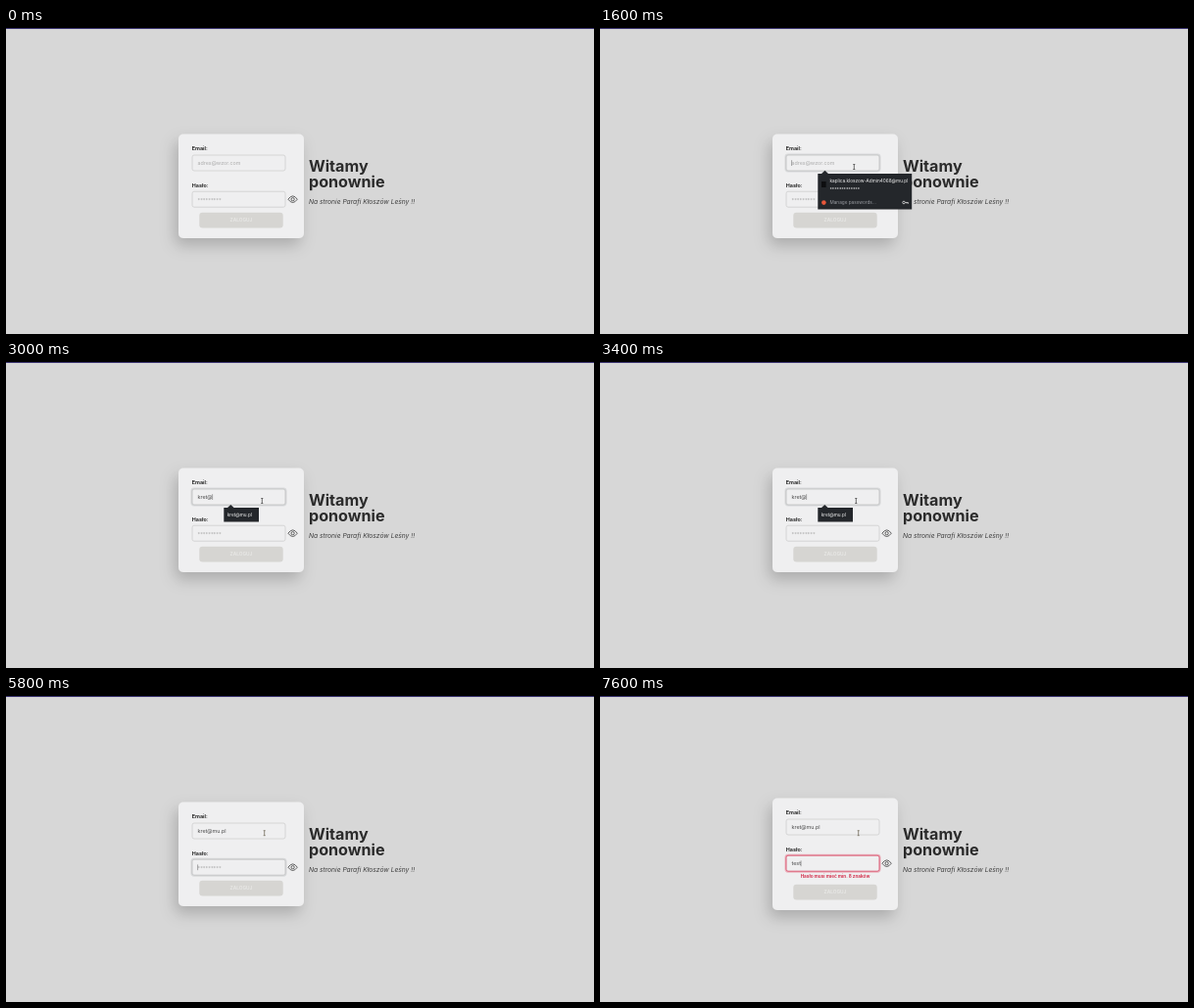
Recreate the animation shown at these times as an HTML page. Size 600 by 313 pixels, loop 8000 ms.

```html
<!DOCTYPE html>
<html lang="pl">
<head>
<meta charset="utf-8">
<title>Logowanie</title>
<style>
  html, body { margin: 0; width: 100%; height: 100%; overflow: hidden; background: #d7d7d7; }
  svg { display: block; width: 100vw; height: 100vh; font-family: Inter, sans-serif; }
  text { white-space: pre; }
  .label { font-size: 5.4px; font-weight: 700; fill: #2c2c2c; }
  .value { font-size: 5.4px; fill: #4c4c4c; }
  .hint { font-size: 5.35px; fill: #acacac; }
  .error { font-size: 4.65px; font-weight: 700; fill: #d43652; text-anchor: middle; }
  .box { fill: #efeff0; stroke: #cfcfcf; stroke-width: .8; }
  .ring { fill: none; stroke: none; stroke-width: 1.6; }
  .focus .box { stroke: #bfc0c1; }
  .focus .ring { stroke: #c9cacc; stroke-opacity: .6; }
  .focus.bad .box { stroke: #d9405f; }
  .focus.bad .ring { stroke: #e8879a; }
  .caret { stroke: #555; stroke-width: .5; }
  .eye { fill: none; stroke: #3c3c3c; stroke-width: .8; }
  .menu { fill: #24272b; }
  .menu text { font-size: 4.7px; fill: #f2f2f2; }
  .menu .dim { fill: #989ba0; }
  .hidden { display: none; }
</style>
</head>
<body>
<svg viewBox="0 0 600 313" preserveAspectRatio="none">
  <defs>
    <filter id="shadow" x="-30%" y="-30%" width="160%" height="170%">
      <feDropShadow dx="-3.5" dy="7.5" stdDeviation="7.5" flood-color="#000" flood-opacity=".2"/>
    </filter>
  </defs>
  <rect width="600" height="313" fill="#d7d7d7"/>
  <rect width="600" height="1" fill="#3a3470"/>

  <g font-weight="700" font-size="16.15" fill="#2b2b2b">
    <text x="309" y="146.8">Witamy</text>
    <text x="309" y="162.8">ponownie</text>
  </g>
  <text x="309" y="180.2" font-size="6.68" font-style="italic" fill="#3f3f3f">Na stronie Parafi Kłoszów Leśny !!</text>

  <rect id="card" x="176" width="128" rx="5" fill="#efeff0" filter="url(#shadow)"/>

  <g id="email">
    <text class="label" x="189.8" y="125.3">Email:</text>
    <rect class="ring" x="189.3" y="129.3" width="96.4" height="17.4" rx="2.6"/>
    <rect class="box" x="190" y="130" width="95" height="16" rx="2"/>
    <text class="hint" x="195.5" y="140">adres@wzor.com</text>
    <text class="value" x="195.5" y="140"></text>
    <path class="caret" d="M0 135.2v5.8"/>
    <text class="error" x="240" y="152.4">Email musi mieć min. 5 znaków</text>
  </g>

  <g id="pass">
    <text class="label" x="189.8" y="162.7">Hasło:</text>
    <rect class="ring" x="189.3" y="166.5" width="96.4" height="17.4" rx="2.6"/>
    <rect class="box" x="190" y="167.2" width="95" height="16" rx="2"/>
    <text class="hint" x="195.5" y="177.6">*********</text>
    <text class="value" x="195.5" y="177.2"></text>
    <path class="caret" d="M0 172.4v5.8"/>
    <text class="error" x="240" y="189.6">Hasło musi mieć min. 8 znaków</text>
    <g class="eye">
      <path d="M287.9 175.2Q292.6 168.6 297.3 175.2Q292.6 181.8 287.9 175.2Z"/>
      <circle cx="292.6" cy="175.2" r="1.6"/>
    </g>
  </g>

  <g id="button">
    <rect x="197.3" y="188.7" width="85.4" height="15.8" rx="3" fill="#d6d5d2"/>
    <text x="240" y="198.3" text-anchor="middle" font-size="4.8" font-weight="600" fill="#e9e9e7">ZALOGUJ</text>
  </g>

  <g id="saved" class="menu">
    <path d="M222.3 149H226L229.5 145.8L233 149H318.2V185.6H222.3Z"/>
    <rect x="226" y="157" width="4.6" height="6" fill="#0d0e10"/>
    <text x="234.5" y="158.3">kaplica.kloszow-Admin4068@mu.pl</text>
    <text x="234.5" y="166.6">*************</text>
    <circle cx="228.4" cy="178.6" r="2.3" fill="#e8573a"/>
    <text class="dim" x="234.5" y="180.4">Manage passwords...</text>
    <g fill="none" stroke="#d8d8d8" stroke-width=".8">
      <circle cx="310" cy="178.5" r="1.3"/>
      <path d="M311.3 178.5H314.4V179.8M313 178.5V179.6"/>
    </g>
  </g>

  <g id="three" class="menu">
    <path d="M222.3 145.3H226L229.3 142.2L232.6 145.3H270.2V183.4H222.3Z"/>
    <text x="225.7" y="154.1">kret4068@mu.pl</text>
    <text x="225.7" y="166.1">kret@mu.pl</text>
    <text x="225.7" y="178.1">kretowy@mu.pl</text>
  </g>

  <g id="one" class="menu">
    <path d="M222.3 149H226L229.3 145.9L232.6 149H258V163.4H222.3Z"/>
    <text x="225.7" y="158">kret@mu.pl</text>
  </g>

  <g id="pointer">
    <path id="arrow" d="M0 0V7.2L1.7 5.7L2.9 8.2L4 7.7L2.9 5.2H5.2Z" fill="#111" stroke="#fff" stroke-width=".5"/>
    <path id="beam" d="M-1 -2.5H1M0 -2.5V2.5M-1 2.5H1" fill="none" stroke-width=".75"/>
  </g>
</svg>
<script>
  const LOOP = 8000;
  const $ = id => document.getElementById(id);

  // Each step changes only the listed properties of the running state.
  const start = { email: '', pass: '', focus: '', caret: true, error: '', menu: '',
                  cursor: '', at: [0, 0], ink: '#3c3c3c' };
  const steps = [
    [0, {}],
    [200, { cursor: 'arrow', at: [363, 153] }],
    [400, { at: [330, 135] }],
    [600, { at: [294, 123] }],
    [800, { cursor: 'beam', at: [271, 133] }],
    [1000, { at: [262, 141] }],
    [1400, { at: [259.3, 142], focus: 'email', menu: 'saved' }],
    [1800, { email: 'k', error: 'email', menu: 'three', at: [266, 145.5], ink: '#b5a24c' }],
    [2000, { email: 'kr' }],
    [2200, { email: 'kre' }],
    [2400, { email: 'kret' }],
    [3000, { email: 'kret@', error: '', menu: 'one', at: [261.3, 142], ink: '#3c3c3c' }],
    [3600, { caret: false }],
    [4000, { caret: true }],
    [4200, { caret: false }],
    [4600, { email: 'kret@m', caret: true }],
    [4800, { email: 'kret@mu.' }],
    [5000, { email: 'kret@mu.p' }],
    [5200, { email: 'kret@mu.pl' }],
    [5400, { menu: '' }],
    [5600, { at: [263.7, 140.2], ink: '#6e6654' }],
    [5800, { focus: 'pass' }],
    [6200, { caret: false }],
    [6400, { caret: true }],
    [7000, { pass: 't', error: 'pass' }],
    [7200, { pass: 'te' }],
    [7400, { pass: 'tes' }],
    [7600, { pass: 'test' }]
  ];

  const show = (el, on) => el.classList.toggle('hidden', !on);
  const move = (el, x, y) => el.setAttribute('transform', `translate(${x} ${y})`);

  function drawField(name, s, dy) {
    const field = $(name), part = c => field.querySelector('.' + c);
    const focused = s.focus === name, bad = s.error === name;
    move(field, 0, dy);
    field.classList.toggle('focus', focused);
    field.classList.toggle('bad', bad);
    show(part('error'), bad);
    show(part('hint'), !s[name]);
    part('value').textContent = s[name];
    const width = s[name] ? part('value').getComputedTextLength() : 0;
    show(part('caret'), focused && s.caret);
    move(part('caret'), 195.6 + width, 0);
  }

  function draw(s) {
    const grow = s.error ? 4 : 0;
    $('card').setAttribute('y', 108.6 - grow);
    $('card').setAttribute('height', 106.4 + 2 * grow);
    drawField('email', s, -grow);
    drawField('pass', s, s.error === 'email' ? grow : -grow);
    move($('button'), 0, grow);
    for (const id of ['saved', 'three', 'one']) show($(id), s.menu === id);
    for (const id of ['arrow', 'beam']) show($(id), s.cursor === id);
    $('beam').setAttribute('stroke', s.ink);
    move($('pointer'), ...s.at);
  }

  let shown = -1;
  function frame() {
    const t = performance.now() % LOOP;
    const count = steps.filter(([time]) => time <= t).length;
    if (count !== shown) {
      shown = count;
      draw(Object.assign({}, start, ...steps.slice(0, count).map(([, change]) => change)));
    }
    requestAnimationFrame(frame);
  }
  frame();
</script>
</body>
</html>
```
